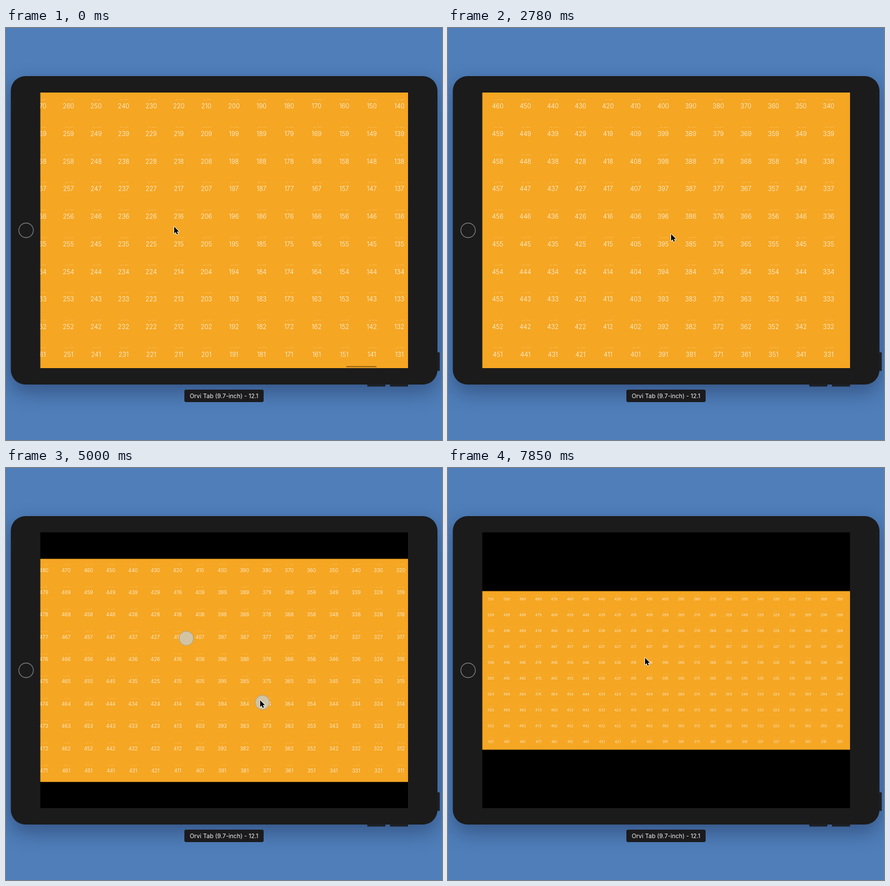
Write an HTML page with a canvas that moves like this. It is 770 px wide and 728 px high and loops after 8000 ms.

```html
<!DOCTYPE html>
<html lang="en">
<head>
<meta charset="utf-8">
<title>Number grid on a tablet</title>
<style>
html, body { margin: 0; width: 100%; height: 100%; overflow: hidden; background: #4f7eb9; }
canvas { display: block; }
</style>
</head>
<body>
<canvas id="stage" width="770" height="728"></canvas>
<script>
const g = document.getElementById('stage').getContext('2d');
const LOOP = 8000, STEP = 180, PHASE = 90;
const CELL = 48.7, REACH = 108.6;
const MID = { x: 385.6, y: 357.6 };
const SCREEN = { x: 60.6, y: 113.8, w: 649.4, h: 487.2 };
const SHOW = 2780, PRESS = 3780, LEAVE = 6250, HIDE = 7200;
const FONT = 'Inter, "Liberation Sans", sans-serif';

const mix = (a, b, p) => a + (b - a) * p;
const ramp = (t, from, to) => Math.min(1, Math.max(0, (t - from) / (to - from)));

// Horizontal place of the column headed 400.
const scrollAt = t => mix(mix(-571.5, -111.5, ramp(t, 0, 810)), 380, ramp(t, 810, 1530));
const zoomAt = t => 1 - .35 * ramp(t, 4300, 5490) - .075 * ramp(t, 5490, 6120);

// Offset of the lower touch from the middle; the upper one mirrors it.
function touchAt(t) {
  const reach = mix(15, REACH, ramp(t, SHOW, 3510)) * zoomAt(t);
  const angle = mix(.63, .7, ramp(t, PRESS, 4590));
  return { dx: reach * Math.cos(angle), dy: reach * Math.sin(angle) };
}

function pointerAt(t) {
  if (t < SHOW) {
    const out = ramp(t, 0, 810), back = ramp(t, 810, 1530);
    return [297 + 157 * out - 60 * back, 351 + 54 * out - 41 * back];
  }
  if (t < LEAVE) {
    const { dx, dy } = touchAt(t), hold = ramp(t, 3600, PRESS);
    return [MID.x + dx + mix(3.5, -4, hold), MID.y + dy + mix(9.5, -4, hold)];
  }
  const p = ramp(t, 7400, 7830);
  return [396 - 48 * p, 352 - 16.5 * p];
}

function box(color, x, y, w, h, r = 0) {
  g.fillStyle = color;
  g.beginPath();
  g.roundRect(x, y, w, h, r);
  g.fill();
}

function shadow(color, blur, x, y) {
  g.shadowColor = color;
  g.shadowBlur = blur;
  g.shadowOffsetX = x;
  g.shadowOffsetY = y;
}

const noShadow = () => shadow('transparent', 0, 0, 0);

function device() {
  box('#4f7eb9', 0, 0, 770, 728);
  shadow('rgba(20,35,70,.43)', 34, 0, 14);
  box('#1b1b1b', 8.5, 85, 753.5, 545, 26);
  noShadow();
  box('#1d1f23', 762, 573, 4, 33, 1);
  for (const x of [638, 678]) box('#1d1f23', x, 629, 32, 4.5, 1);
  g.strokeStyle = '#85878a';
  g.lineWidth = 1.2;
  g.beginPath();
  g.arc(35.5, 357.5, 12.8, 0, 7);
  g.stroke();
  box('#1b1b1e', 315, 639, 140, 22, 3);
  g.fillStyle = '#f4f4f4';
  g.font = '10.5px ' + FONT;
  g.fillText('Orvi Tab (9.7-inch) - 12.1', 385, 650.5);
}

function grid(x400, s) {
  const { x, y, w, h } = SCREEN;
  g.save();
  box('#000', x, y, w, h);
  g.beginPath();
  g.rect(x, y, w, h);
  g.clip();
  g.translate(MID.x, MID.y);
  g.scale(s, s);
  box('#f5a623', -w, -h / 2, 2 * w, h);
  g.font = '300 11px ' + FONT;
  const origin = x400 - MID.x, reach = w / 2 / s + 30;
  const first = Math.ceil(40 + (origin - reach) / CELL);
  const last = Math.floor(40 + (origin + reach) / CELL);
  for (let col = first; col <= last; col++) {
    const cx = origin - (col - 40) * CELL;
    for (let row = 0; row < 10; row++) {
      const cy = (row - 4.5) * CELL + .6;
      g.fillStyle = '#fffaf0';
      g.fillText(col * 10 - row, cx, cy);
      g.fillStyle = 'rgba(255,240,205,.3)';
      g.fillRect(cx - 6, cy - 12.6, 5, .9);
      g.fillRect(cx + 1, cy - 12.9, 8, .9);
    }
  }
  g.restore();
}

function touch(x, y, pressed) {
  if (!pressed) shadow('rgba(60,40,0,.5)', 4, 2.5, 2.5);
  g.fillStyle = pressed ? 'rgba(205,200,183,.87)' : '#c2b9a7';
  g.beginPath();
  g.arc(x, y, 12.6, 0, 7);
  g.fill();
  noShadow();
  g.strokeStyle = '#aba18d';
  g.lineWidth = 1;
  g.stroke();
}

function arrow(x, y) {
  const points = [[0, 0], [0, 12], [2.8, 9.5], [4.7, 13.8], [6.7, 12.9], [4.9, 8.7], [8.6, 8.7]];
  g.beginPath();
  points.forEach(([px, py]) => g.lineTo(x + px, y + py));
  g.closePath();
  g.lineJoin = 'round';
  g.lineWidth = 1.7;
  g.strokeStyle = '#fff';
  g.stroke();
  g.fillStyle = '#000';
  g.fill();
}

function draw(t) {
  g.textAlign = 'center';
  g.textBaseline = 'middle';
  device();
  const x400 = scrollAt(t), s = zoomAt(t);
  grid(mix(MID.x, x400, s), s);
  const alpha = .6 * (1 - ramp(t, 1530, 2030));
  box(`rgba(70,45,5,${alpha})`, 554.3 - .0814 * x400, 597.5, 53.5, 1.8, 1);
  if (t >= SHOW && t < HIDE) {
    const { dx, dy } = touchAt(t);
    for (const side of [-1, 1]) touch(MID.x + side * dx, MID.y + side * dy, t >= PRESS);
  }
  arrow(...pointerAt(t));
}

// The picture advances in even steps, like a screen recording.
function frame(now) {
  const t = now % LOOP;
  draw(Math.max(0, Math.floor((t - PHASE) / STEP) * STEP + PHASE));
  requestAnimationFrame(frame);
}
requestAnimationFrame(frame);
</script>
</body>
</html>
```
